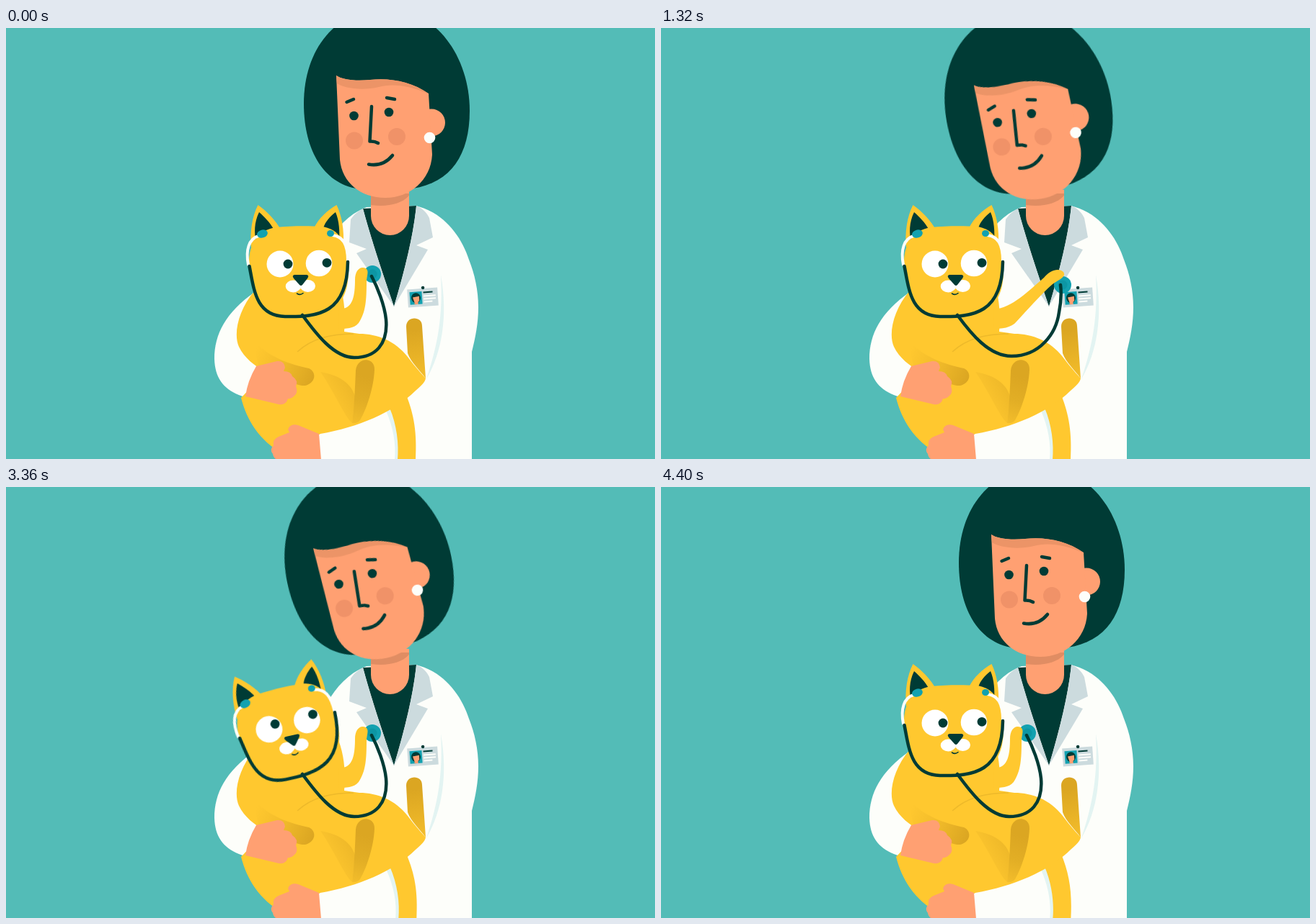
Recreate the animation shown at these times as an HTML page. Size 900 by 599 pixels, loop 4480 ms.

```html
<!DOCTYPE html>
<html lang="en">
<head>
<meta charset="utf-8">
<title>Vet and cat</title>
<style>
  :root {
    --dark: #003b35; --skin: #ffa072; --coat: #fdfefa; --lapel: #ccdbde;
    --cat: #ffc82f; --teal: #12a1b0;
  }
  html, body { margin: 0; width: 100%; height: 100%; overflow: hidden; background: #53bcb7; }
  svg { display: block; width: 100%; height: 100%; }

  .dark { fill: var(--dark); }
  .skin { fill: var(--skin); }
  .coat { fill: var(--coat); }
  .lapel { fill: var(--lapel); }
  .cat { fill: var(--cat); }
  .teal { fill: var(--teal); }
  .crease { fill: #e3f4f2; }
  .line { fill: none; stroke: var(--dark); stroke-width: 4.5; stroke-linecap: round; stroke-linejoin: round; }
  .tube { fill: none; stroke: var(--coat); stroke-width: 4; stroke-linecap: round; }

  .move {
    animation-duration: 4480ms;
    animation-iteration-count: infinite;
    animation-timing-function: cubic-bezier(.33, 0, .67, 1);
  }
  .vet-head { transform-origin: 535px 230px; animation-name: vet-tilt; }
  .cat-head { transform-origin: 412px 400px; animation-name: cat-tilt; }
  .pupils { animation-name: look; }
  .eye { transform-box: fill-box; transform-origin: center; animation-name: blink; }
  .arm { animation-name: arm; }
  .cord { animation-name: cord; }
  .piece { animation-name: piece; }
  .tail { animation-name: tail; }
  .tail-shadow { animation-name: tail-shadow; }

  @keyframes vet-tilt {
    0%, 22.32%, 96.88%, 100% { transform: rotate(0deg); }
    33.04%, 82.37% { transform: rotate(-11.8deg); }
  }
  @keyframes cat-tilt {
    0%, 37.95%, 83.04%, 100% { transform: rotate(0deg); }
    47.77%, 73.21% { transform: rotate(-14deg); }
  }
  @keyframes look {
    0%, 37.5%, 82.5%, 100% { transform: translate(0, 0); }
    43.3%, 73.21% { transform: translate(-1.5px, -6px); }
  }
  @keyframes blink {
    0%, 42.86%, 48.21%, 82.14%, 87.5%, 100% { transform: scaleY(1); }
    45.54%, 84.82% { transform: scaleY(.1); }
  }
  @keyframes arm {
    0%, 56.25%, 100% { d: path("M462,390 C481,392 484,372 484,350 C484,337 491,330 499,334 C504,338 500,345 500,352 C500,378 499,395 489,410 C482,418 472,418 460,418 Z"); }
    11.61%, 16.52% { d: path("M462,391 C487,387 505,364 517,341 C523,325 531,318 540,321 C546,327 538,334 533,341 C521,360 506,390 491,409 C484,417 472,418 460,418 Z"); }
    29.46%, 45.54% { d: path("M462,391 C487,389 510,365 531,347 C540,336 552,333 558,339 C563,346 551,350 543,356 C527,370 508,392 493,408 C486,417 472,418 460,418 Z"); }
  }
  @keyframes cord {
    0%, 56.25%, 100% { d: path("M411,399 C430,425 455,458 483,458 C512,458 530,440 527,405 C525,385 515,360 507,345"); }
    11.61%, 16.52% { d: path("M411,399 C430,425 455,448 485,448 C525,448 545,420 546,390 C546,370 544,352 541,340"); }
    29.46%, 45.54% { d: path("M411,399 C430,425 455,456 486,456 C525,456 548,425 552,395 C555,380 555,365 554,357"); }
  }
  @keyframes piece {
    0%, 56.25%, 100% { transform: translate(508px, 342px); }
    11.61%, 16.52% { transform: translate(543px, 338px); }
    29.46%, 45.54% { transform: translate(557px, 357px); }
  }
  @keyframes tail {
    0%, 73.21%, 99.5%, 100% { d: path("M532,528 C542,552 545,578 543,600 L568,600 C570,562 566,538 555,510 Z"); }
    83.9% { d: path("M536,526 C553,548 562,575 560,600 L585,600 C587,565 580,540 557,510 Z"); }
  }
  @keyframes tail-shadow {
    0%, 73.21%, 99.5%, 100% { d: path("M527,532 C537,555 541,578 539,600 L546,600 C547,575 543,550 533,528 Z"); }
    83.9% { d: path("M531,530 C548,550 556,575 554,600 L563,600 C562,575 553,548 537,526 Z"); }
  }
</style>
</head>
<body>
<svg viewBox="0 0 900 599" preserveAspectRatio="none">
  <defs>
    <linearGradient id="paw" gradientUnits="userSpaceOnUse" x1="345" y1="450" x2="425" y2="488">
      <stop offset="0" stop-color="#dba622" stop-opacity="0"/>
      <stop offset=".4" stop-color="#dba622" stop-opacity=".3"/>
      <stop offset="1" stop-color="#dba622"/>
    </linearGradient>
    <linearGradient id="thigh" gradientUnits="userSpaceOnUse" x1="446" y1="528" x2="487" y2="505">
      <stop offset="0" stop-color="#dba622" stop-opacity="0"/>
      <stop offset="1" stop-color="#dba622" stop-opacity=".5"/>
    </linearGradient>
    <linearGradient id="leg" gradientUnits="userSpaceOnUse" x1="500" y1="485" x2="482" y2="550">
      <stop offset="0" stop-color="#dba622"/>
      <stop offset=".5" stop-color="#e2ae25"/>
      <stop offset="1" stop-color="#f3bd2b"/>
    </linearGradient>
    <linearGradient id="far-leg" gradientUnits="userSpaceOnUse" x1="567" y1="420" x2="574" y2="487">
      <stop offset="0" stop-color="#dba622"/>
      <stop offset="1" stop-color="#f3bd2b"/>
    </linearGradient>
  </defs>

  <!-- coat -->
  <path class="coat" d="M500,249 C474,259 455,280 440,310 L345,367 C305,395 289,425 289,460 C290,490 305,506 335,514 L400,520 L400,599 L646,599 L646,450 C651,430 655,410 655,388 C655,365 650,342 642,322 C632,290 607,256 568,247 Z"/>
  <path class="crease" d="M603,343 C613,400 605,450 583,488 C599,440 606,400 603,343 Z"/>
  <path class="dark" d="M495,251 L569,247 Q564,300 538,387 Q508,300 495,251 Z"/>
  <path class="lapel" d="M495,251 C487,255 482,260 478,266 L476,298 L500,307 L486,313 L538,387 Q508,300 495,251 Z"/>
  <path class="lapel" d="M569,247 C577,250 583,256 587,264 L592,291 L569,302 L585,308 L538,387 Q564,300 569,247 Z"/>
  <path class="skin" d="M506,225 V261 A26.5,27 0 0 0 559,261 V225 Z"/>
  <path fill="#e08d63" d="M506,230 H559 V233 C548,245 528,249 506,246 Z"/>

  <!-- badge -->
  <g transform="translate(578 374.5) rotate(-4)">
    <rect class="lapel" x="-21" y="-12.5" width="42" height="25"/>
    <rect class="teal" x="-18" y="-8.5" width="17" height="17.5"/>
    <ellipse class="dark" cx="-9.5" cy="0" rx="6.5" ry="7"/>
    <path class="skin" d="M-14,-1 L-5,-2 V4 L-7,6 V9 H-12 V6 Z"/>
    <path d="M1,-7 H14" stroke="#003b35" stroke-width="2"/>
    <path d="M1,-2 H18 M1,2 H18 M1,6 H13" stroke="#fdfefa" stroke-width="2"/>
    <circle class="dark" cx="1" cy="-13.5" r="2.3"/>
  </g>

  <!-- vet's head -->
  <g class="move vet-head">
    <path class="dark" d="M492,224 C443,219 413,173 413,105 C413,30 457,-27 528,-27 C596,-27 643,40 643,115 C643,176 617,215 564,223 Z"/>
    <circle class="skin" cx="590" cy="131.5" r="19"/>
    <path class="skin" d="M458,66 L463,183 C466,215 492,236 526,236 C560,236 589,212 591,176 L586,91 C562,74 532,69 505,72 C485,74 466,72 458,66 Z"/>
    <path fill="#ec9467" d="M458,66 C466,72 485,74 505,72 C532,69 562,74 587,92 C558,79 535,77 517,82 C492,88 468,83 459,77 Z"/>
    <circle cx="483" cy="156.5" r="12" fill="#f09268"/>
    <circle cx="542" cy="151" r="12" fill="#f09268"/>
    <path class="line" d="M472.5,103 L482,99 M528,97 L539,99 M507,109 L504.5,157.5 Q511,157 516,160 M503,189.5 Q523,193 536,177"/>
    <circle class="dark move eye" cx="482.5" cy="122" r="6.3"/>
    <circle class="dark move eye" cx="531" cy="117" r="6.3"/>
    <circle class="coat" cx="587.5" cy="152.5" r="7.8"/>
  </g>

  <!-- cat's body -->
  <path class="crease move tail-shadow" d="M527,532 C537,555 541,578 539,600 L546,600 C547,575 543,550 533,528 Z"/>
  <path class="cat move tail" d="M532,528 C542,552 545,578 543,600 L568,600 C570,562 566,538 555,510 Z"/>
  <path class="cat" d="M345,365 C322,392 315,425 323,443 C330,458 345,470 360,478 L326,514 C334,545 350,572 385,593 L436,564 C488,555 538,534 568,504 C577,496 581,492 582,487 C572,476 562,464 557,457 C540,435 515,425 490,425 L469,422 C471,400 470,370 458,345 Z"/>
  <path fill="url(#paw)" d="M343,433 C362,457 395,468 420,473 C431,478 430,493 415,497 C400,498 385,485 350,470 Z"/>
  <path d="M404,450 C425,431 450,425.5 482,425" fill="none" stroke="#edb92a" stroke-width="1.5"/>
  <path fill="url(#thigh)" d="M436,478 C466,483 480,497 484,512 L480,549 C468,538 455,505 436,478 Z"/>
  <path fill="url(#leg)" d="M485,476 C487,456 512,457 511,475 C510,500 500,530 491,545 C488,549 484,550 480,549 C483,525 484,500 485,476 Z"/>
  <path fill="url(#far-leg)" d="M555,415 C555,400 577,400 577,414 L582,487 C575,477 561,464 557,452 Z"/>

  <!-- hands -->
  <path class="skin" d="M332,512 Q335,490 347,470 L376,463 Q386,462 387,472 L385,477 Q395,477 397,484 Q406,490 402,498 Q406,507 399,512 Q395,516 391,515 Q388,525 378,523 Z"/>
  <path class="skin" d="M434,564 L405,552 Q394,549 391,558 L393,562 L378,568 Q369,572 371,580 Q365,586 370,592 Q371,598 376,600 H437 Z"/>

  <!-- stethoscope piece and raised arm -->
  <g class="move piece">
    <circle class="teal" r="12"/>
    <circle r="6.5" fill="#0d96a4"/>
  </g>
  <path class="cat move arm" d="M462,390 C481,392 484,372 484,350 C484,337 491,330 499,334 C504,338 500,345 500,352 C500,378 499,395 489,410 C482,418 472,418 460,418 Z"/>

  <!-- cat's head -->
  <g class="move cat-head">
    <path class="cat" d="M349.5,246 C341,262 338,285 340,305 L382,282 C374,267 362,255 349.5,246 Z M458.5,246 C446,253 434,264 427,278 L468,302 C469,280 466,262 458.5,246 Z"/>
    <path class="dark" d="M351,256 C344,270 344,285 347,298 L372,281 C366,270 358,262 351,256 Z M457,256 C449,262 443,269 440,278 L462,297 C463,282 462,268 457,256 Z"/>
    <path class="cat" d="M375,277 C395,275 420,275 437,276 C462,278 474,300 475,330 C476,375 462,400 408,401 C355,401 338,375 337,325 C337,300 350,280 375,277 Z"/>
    <path class="tube" d="M350,289 C337,293 332,308 336,329 M453,288 C467,290 474,300 474,324"/>
    <ellipse class="teal" cx="355.5" cy="286" rx="7.5" ry="5.5" transform="rotate(-15 355.5 286)"/>
    <ellipse class="teal" cx="450" cy="285.5" rx="5" ry="4.5"/>
    <path class="line" d="M337.5,331 C344,365 347,400 387,401 C434,402 473,396 474,325"/>
    <g fill="#fff">
      <circle cx="380" cy="328" r="18.5"/>
      <circle cx="434" cy="327" r="18.3"/>
      <ellipse cx="398.5" cy="359" rx="10.8" ry="8.5"/>
      <ellipse cx="418.5" cy="358.5" rx="10.5" ry="8.5"/>
    </g>
    <path class="cat" d="M401,368 L408,363 L415,367 L408,374 Z"/>
    <g class="dark move pupils">
      <circle cx="391" cy="328" r="6.4"/>
      <circle cx="445" cy="326.3" r="6.4"/>
    </g>
    <path class="dark" d="M400,343 H417 Q421,344 418,348 L411,357 Q409,359 407,357 L399,348 Q396,344 400,343 Z"/>
    <path d="M403.5,369 Q408,372 412,368.5" fill="none" stroke="#003b35" stroke-width="1.6" stroke-linecap="round"/>
  </g>

  <path class="line move cord" d="M411,399 C430,425 455,458 483,458 C512,458 530,440 527,405 C525,385 515,360 507,345"/>
</svg>
</body>
</html>
```
